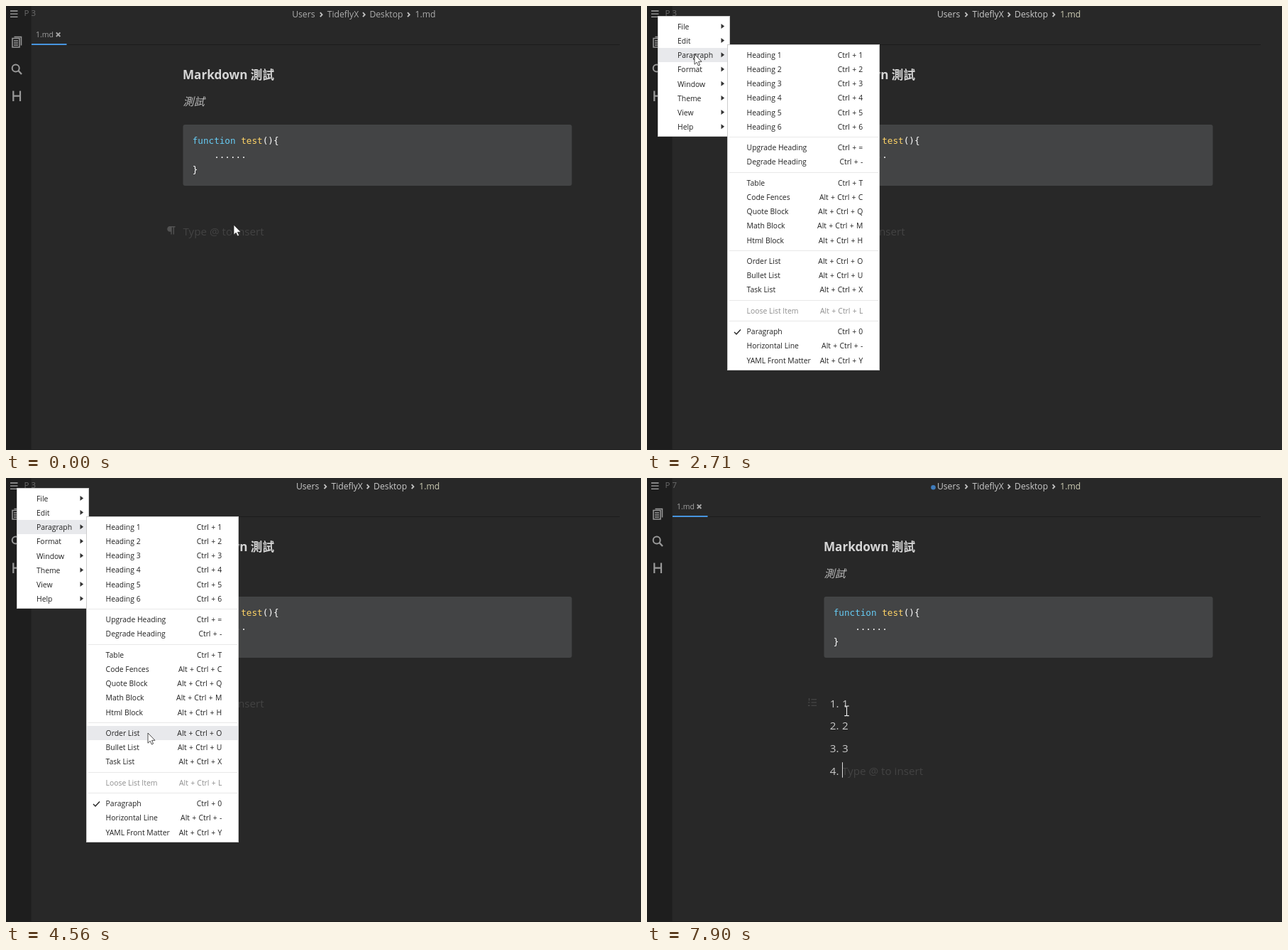
These frames come from a looping animation (895x625 px, 8000 ms). An HTML page:

```html
<!DOCTYPE html>
<html lang="zh-Hant">
<head>
<meta charset="utf-8">
<title>Markdown editor</title>
<style>
html, body { margin: 0; width: 100%; height: 100%; overflow: hidden; background: #282828; }
svg { display: block; width: 895px; height: 625px; }
text { font-family: "Open Sans", "Noto Sans CJK TC", "Noto Sans CJK SC", "Noto Sans CJK JP", "Noto Sans CJK", sans-serif; white-space: pre; }
.body { font-size: 15.2px; fill: #c9c9c9; }
.ghost { font-size: 15.2px; fill: #434343; }
.code { font: 12.65px "DejaVu Sans Mono", monospace; fill: #fff; }
.crumb { font-size: 12.2px; }
.menu text { font-size: 10.4px; fill: #222; }
.menu text.off { fill: #8e8e8e; }
.end { text-anchor: end; word-spacing: .55px; }
.line { fill: none; }
</style>
</head>
<body>
<svg id="stage" viewBox="0 0 895 625"></svg>
<script>
const LOOP = 8000, STEP = 77.45, ROW = 20.2, GAP = 9.2, LINE = 31.9;
const HINT = 'Type @ to insert';

const MAIN = ['File', 'Edit', 'Paragraph', 'Format', 'Window', 'Theme', 'View', 'Help'];
const SUB = [
  'Heading 1|Ctrl + 1', 'Heading 2|Ctrl + 2', 'Heading 3|Ctrl + 3',
  'Heading 4|Ctrl + 4', 'Heading 5|Ctrl + 5', 'Heading 6|Ctrl + 6', '',
  'Upgrade Heading|Ctrl + =', 'Degrade Heading|Ctrl + -', '',
  'Table|Ctrl + T', 'Code Fences|Alt + Ctrl + C', 'Quote Block|Alt + Ctrl + Q',
  'Math Block|Alt + Ctrl + M', 'Html Block|Alt + Ctrl + H', '',
  'Order List|Alt + Ctrl + O', 'Bullet List|Alt + Ctrl + U', 'Task List|Alt + Ctrl + X', '',
  'Loose List Item|Alt + Ctrl + L', '',
  'Paragraph|Ctrl + 0', 'Horizontal Line|Alt + Ctrl + -', 'YAML Front Matter|Alt + Ctrl + Y'
];

// Pointer path: [step, x, y]
const PATH = [
  [0, 321, 308], [1, 311, 296], [4, 150, 130], [7, 22, 20], [8, 14, 12],
  [18, 14, 12], [20, 37, 40], [24, 57, 62], [27, 64, 67], [28, 64, 67],
  [29, 66, 67], [34, 66, 67], [35, 67, 68], [38, 118, 76], [45, 148, 219],
  [49, 170, 274], [56, 194, 348], [59, 200, 359], [61, 200, 359], [67, 281.5, 328]
];

const text = (x, y, s, cls, more = '') => `<text x="${x}" y="${y}" class="${cls}" ${more}>${s}</text>`;
const rect = (x, y, w, h, fill, more = '') => `<rect x="${x}" y="${y}" width="${w}" height="${h}" fill="${fill}" ${more}/>`;
const line = (d, color, w, more = '') => `<path class="line" d="${d}" stroke="${color}" stroke-width="${w}" ${more}/>`;
const panel = (x, y, w, h) => rect(x, y, w, h, '#fff', 'stroke="#ccc"');

const subRows = [];
let rowY = 59;
for (const item of SUB) {
  const [name, keys] = item.split('|');
  subRows.push({ name, keys, y: rowY });
  rowY += name ? ROW : GAP;
}

const frame = `
  ${rect(0, 0, 895, 625, '#282828')}
  ${rect(0, 0, 35.5, 625, '#1e1e1e')}
  ${rect(36, 54, 829, 1, '#1c1c1c')}
  ${rect(0, 624, 895, 1, '#1f1f1f')}
  ${line('M6 7H16.5M6 11.2H16.5M6 15.4H16.5', '#a8a8a8', 1.3)}
  ${text(25.6, 14, 'P 3', '', 'id="count" font-size="11.5" fill="#6c6c6c"')}
  ${line('M11.5 43.5H21.5V55.5', '#999', 1.5)}
  ${line('M9 45.5H19V58H9Z', '#999', 1.5)}
  ${line('M11 49H17M11 52H17M11 55H17', '#999', 1.4)}
  <circle class="line" cx="13.7" cy="87.4" r="5" stroke="#999" stroke-width="2"/>
  ${line('M17.3 91L22 96', '#999', 2.4)}
  ${line('M10.3 119.5V134M20 119.5V134M10.3 126.7H20', '#999', 2.2)}
  ${text(42, 44, '1.md', '', 'font-size="10.5" fill="#a0a0a0"')}
  ${line('M70.8 37.4L76.4 43M76.4 37.4L70.8 43', '#a6a6a6', 2)}
  ${rect(36, 53, 49.5, 2, '#4795e0')}
  <circle id="dot" cx="403.5" cy="13.3" r="3.3" fill="#3f7cbc"/>
  <g id="crumbs" class="crumb">
    ${text(403.2, 16.2, 'Users', '')}
    ${text(452.7, 16.2, 'TideflyX', '')}
    ${text(512.4, 16.2, 'Desktop', '')}
    ${text(576.5, 16.2, '1.md', '', 'id="file"')}
    ${[442.8, 503, 566].map(x => line(`M${x} 9.2L${x + 2.8} 12.2L${x} 15.2`, '#c4c4c4', 1.8)).join('')}
  </g>`;

const page = `
  ${text(249, 103, 'Markdown <tspan font-size="16.6">測試</tspan>', '', 'font-size="17.1" font-weight="700" fill="#d6d6d6"')}
  ${text(249.5, 140, '測試', '', 'font-size="15.2" font-style="italic" fill="#bdbdbd"')}
  ${rect(249.5, 167, 548, 86, '#434445', 'rx="3"')}
  ${text(262.7, 193.7, '<tspan fill="#66ccf5">function</tspan> <tspan fill="#ffd466">test</tspan>(){', 'code')}
  ${text(262.7, 214.2, '    ......', 'code')}
  ${text(262.7, 234.6, '}', 'code')}
  <g id="blank">
    ${line('M238.5 310.8H230.5A3.2 3.2 0 0 0 230.5 317H232.5M233 311V321.5M236.3 311V321.5', '#525252', 1.4)}
    <path d="M233 311H230.5A3 3 0 0 0 230.5 317H233Z" fill="#525252"/>
    ${text(249.5, 322.5, HINT, 'ghost')}
  </g>
  <g id="list">
    ${line('M231.5 311.8H239M231.5 316H239M231.5 320.2H239', '#4c4c4c', 1.1)}
    ${line('M228.5 310V313.5M227 316H229.5M227 320.3H229.5', '#4c4c4c', 1.2)}
    ${[1, 2, 3, 4].map(n => `<g class="item" transform="translate(0 ${(n - 1) * LINE})">
      ${text(257.8, 322.5, n + '.', 'body')}
      ${text(275, 322.5, n, 'body value')}
      ${text(275, 322.5, HINT, 'ghost')}</g>`).join('')}
    ${rect(0, 304.5, 1, 21.5, '#dcdcdc', 'id="caret"')}
  </g>`;

const menus = `
  <g id="main" class="menu">
    ${panel(15.5, 14.5, 101, 169)}
    ${rect(16, 0, 100, 20, '#e8e9ec', 'id="mainHot"')}
    ${MAIN.map((s, i) => text(43, 32.8 + i * ROW, s, '') +
      `<path d="M104.5 ${24.9 + i * ROW}l4.6 3.5l-4.6 3.5z" fill="#333"/>`).join('')}
  </g>
  <g id="sub" class="menu">
    ${panel(113.5, 54.5, 214, 458)}
    ${rect(114, 0, 213, 20, '#e8e9ec', 'id="subHot"')}
    ${subRows.map(({ name, keys, y }) => {
      if (!name) return rect(116, Math.round(y + 4), 210, 1, '#e8e8e8');
      const cls = name.startsWith('Loose') ? 'off' : '';
      return text(140.6, y + 13.8, name, cls) + text(304.3, y + 13.8, keys, cls + ' end');
    }).join('')}
    ${line('M123 459L126 462L132 455.6', '#222', 1.4)}
  </g>`;

const pointers = `
  <path id="arrow" d="M0 0V14.2L3.2 11.2L5.4 16L7.6 15L5.5 10.3H10Z" fill="#fff" stroke="#222" stroke-width=".8"/>
  <g id="beam">${line('M-3.2 -7H-.8L0 -6.4L.8 -7H3.2M0 -6.4V6M-3.2 6.6H-.8L0 6L.8 6.6H3.2', '#f2f2f2', 1.1)}</g>`;

document.getElementById('stage').innerHTML = frame + page + menus + pointers;

const el = id => document.getElementById(id);
const set = (node, name, value) => node.setAttribute(name, value);
const show = (node, on) => set(node, 'opacity', +on);
const place = (node, x, y) => set(node, 'transform', `translate(${x} ${y})`);
const items = [...document.querySelectorAll('.item')];

function pointerAt(n) {
  const i = PATH.findIndex(p => p[0] >= n);
  if (i < 0) return PATH[PATH.length - 1].slice(1);
  if (i === 0) return PATH[0].slice(1);
  const [a, x0, y0] = PATH[i - 1], [b, x1, y1] = PATH[i];
  const k = (n - a) / (b - a);
  return [x0 + (x1 - x0) * k, y0 + (y1 - y0) * k];
}

function drawMenus(t, x, y) {
  const open = t >= 1000 && t < 4790;
  show(el('main'), !open ? 0 : t < 1080 ? .5 : t < 1160 ? .85 : 1);
  const subOpen = open && t >= 2030;
  show(el('sub'), !subOpen ? 0 : t < 2105 ? .6 : 1);

  const inSub = subOpen && x >= 114;
  const row = inSub ? 2 : Math.floor((y - 19) / ROW);
  set(el('mainHot'), 'y', Math.round(19 + row * ROW));
  show(el('mainHot'), x > 16 && row >= 0 && row < MAIN.length);

  const hot = inSub && subRows.find(r => r.name && y >= r.y && y < r.y + ROW);
  show(el('subHot'), !!hot);
  if (hot) set(el('subHot'), 'y', Math.round(hot.y));
}

function drawList(t) {
  const listed = t >= 4865;
  const count = 1 + (t >= 6980) + (t >= 7435) + (t >= 7895);
  const typed = (t >= 6745) + (t >= 7355) + (t >= 7745);
  show(el('blank'), !listed);
  show(el('list'), listed);
  items.forEach((g, i) => {
    show(g, i < count);
    show(g.querySelector('.value'), i < typed);
    show(g.querySelector('.ghost'), i >= typed);
  });
  const dark = t >= 5330 && t < 5810 || t >= 6360 && t < 6745;
  show(el('caret'), !dark);
  place(el('caret'), typed === count ? 283.2 : 275, (count - 1) * LINE);
  el('count').textContent = 'P ' + (listed ? 3 + count : 3);
  show(el('dot'), !listed || t >= 5880 && t < 6745 ? 0 : t >= 5810 && t < 5880 ? .5 : 1);
}

function draw(t) {
  const n = Math.floor((t + 16) / STEP);
  const [x, y] = pointerAt(n);
  const typing = t >= 4790;
  place(el('arrow'), x, y);
  place(el('beam'), x, y);
  show(el('arrow'), !typing);
  show(el('beam'), typing);

  const active = t >= 1000;
  place(el('crumbs'), active ? 5.7 : 0, 0);
  set(el('crumbs'), 'fill', active ? '#c9c9c9' : '#adadad');
  set(el('file'), 'fill', !active ? '#adadad' : t < 1620 ? '#9c9c88' : '#cfceb6');
  drawMenus(t, x, y);
  drawList(t);
}

function tick() {
  draw(performance.now() % LOOP);
  requestAnimationFrame(tick);
}
tick();
</script>
</body>
</html>
```
